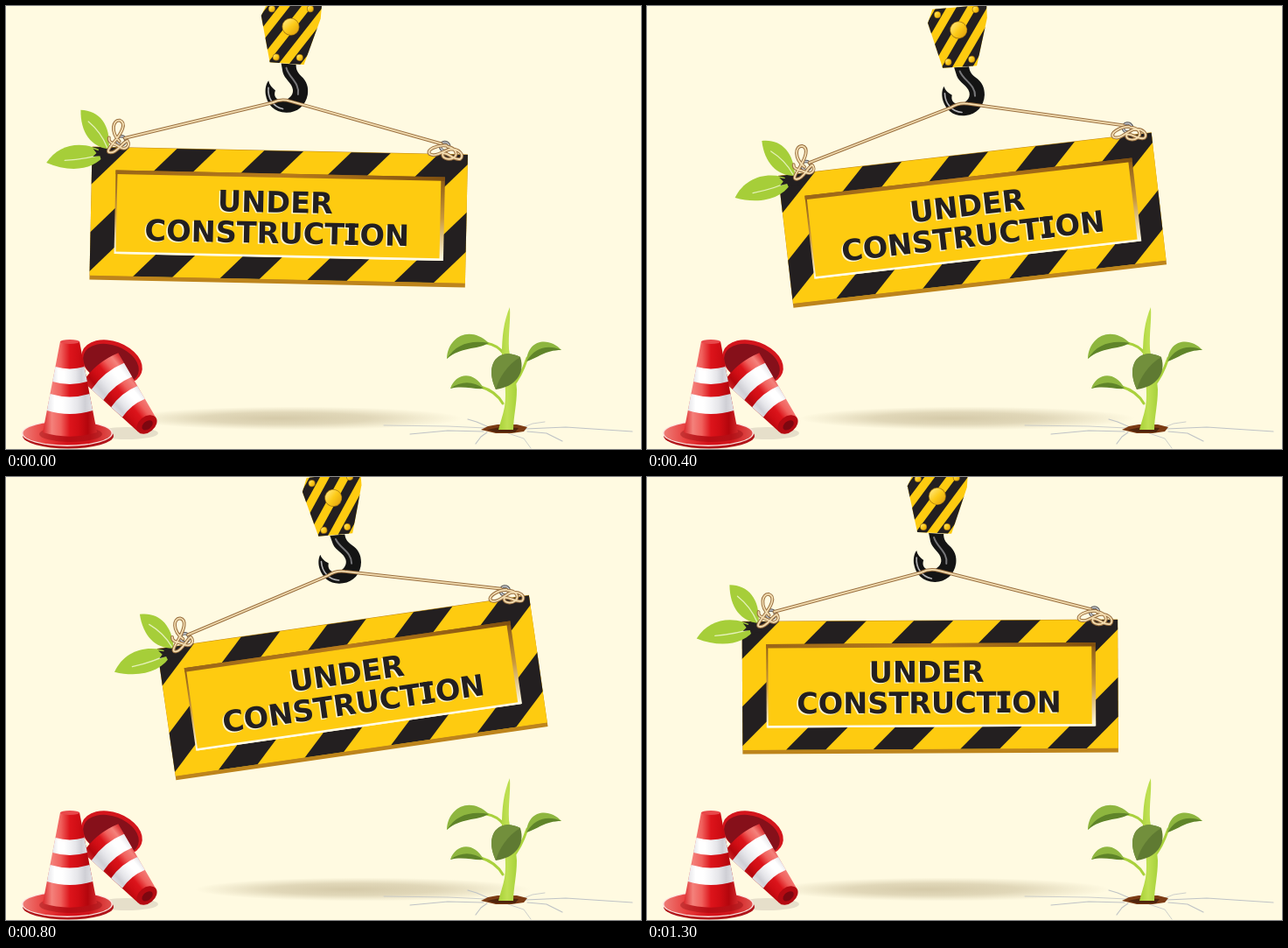
These frames come from a looping animation (726 by 506 pixels, 1400 ms). An HTML page with a canvas:

```html
<!DOCTYPE html>
<html lang="en">
<head>
<meta charset="utf-8">
<title>Under construction</title>
<style>
html, body { margin: 0; width: 100%; height: 100%; overflow: hidden; background: #fffae1; }
canvas { display: block; }
</style>
</head>
<body>
<canvas id="stage" width="726" height="506"></canvas>
<script>
const c = document.getElementById('stage').getContext('2d');
const YELLOW = '#fecb10', BLACK = '#231f20';
const STEP = 100, STEPS = 14;
const PIVOT = { x: 324, y: 237 };

// step, sign centre x, y, angle in degrees, shadow centre x
const poses = [
  [0, 312, 238.5, 1.2, 330],
  [2, 355, 243, -4.6, 374],
  [4, 372, 242, -6.6, 366],
  [6, 394.5, 235.5, -8.9, 417],
  [7, 416, 233, -9.8, 428],
  [8, 396, 238, -8.2, 408],
  [11, 347, 241, -3, 366],
  [12, 333, 239.5, -1.5, 352],
  [13, 324, 237, -0.3, 338]
];

function poseAt(step) {
  const i = poses.findIndex(p => p[0] >= step);
  const b = poses[i], a = poses[Math.max(0, i - 1)];
  const k = b === a ? 0 : (step - a[0]) / (b[0] - a[0]);
  return a.map((v, n) => v + (b[n] - v) * k);
}

function fill(d, color) {
  c.fillStyle = color;
  c.fill(new Path2D(d));
}

function line(d, color, width) {
  c.strokeStyle = color;
  c.lineWidth = width;
  c.stroke(new Path2D(d));
}

function ellipse(x, y, rx, ry, color, tilt = 0) {
  c.fillStyle = color;
  c.beginPath();
  c.ellipse(x, y, rx, ry, tilt, 0, Math.PI * 2);
  c.fill();
}

function ramp(x0, y0, x1, y1, ...colors) {
  const g = c.createLinearGradient(x0, y0, x1, y1);
  colors.forEach((v, i) => g.addColorStop(i / (colors.length - 1), v));
  return g;
}

function rope(d) {
  line(d, '#9a7040', 3.8);
  line(d, '#f2dcb0', 1.8);
}

function shadow(x) {
  c.save();
  c.translate(x, 471);
  c.scale(1, 0.07);
  const g = c.createRadialGradient(-20, 0, 0, 0, 0, 192);
  g.addColorStop(0, 'rgba(150,130,85,.4)');
  g.addColorStop(0.5, 'rgba(150,130,85,.29)');
  g.addColorStop(0.8, 'rgba(150,130,85,.11)');
  g.addColorStop(1, 'rgba(150,130,85,0)');
  ellipse(0, 0, 192, 192, g);
  c.restore();
}

// Tip at the origin, widening downwards
function cone(h, top, foot, bands) {
  const half = y => top + (foot - top) * y / h;
  const band = (y0, y1, colors) => {
    const a = half(y0), b = half(y1);
    fill(`M${-a},${y0} L${-b},${y1} Q0,${y1 + b * 0.3} ${b},${y1} L${a},${y0} Q0,${y0 + a * 0.3} ${-a},${y0}Z`,
      ramp(-b, 0, b, 0, ...colors));
  };
  const red = ['#d9272a', '#f4817b', '#f0605c', '#dc141b', '#cf0d14', '#b3060d', '#cf2a2c'];
  const white = ['#e4e4e8', '#ffffff', '#ffffff', '#f4f4f6', '#e6e6ea', '#cfcfd5', '#e2e2e6'];
  band(0, h, red);
  bands.forEach(([y0, y1]) => band(y0, y1, white));
  ellipse(0, 0.5, top, top * 0.22, '#e8484a');
}

function cones() {
  ellipse(138, 488, 36, 7, 'rgba(140,130,120,.22)');
  ellipse(121, 407, 36, 24, '#d3151c', 0.35);
  ellipse(120, 409, 33, 21.5, '#86101a', 0.35);
  c.save();
  c.translate(161, 478);
  c.rotate(141 * Math.PI / 180);
  cone(84, 13, 26, [[24, 41], [53, 71]]);
  ellipse(0, 0, 13, 9, '#b50a12');
  ellipse(0, -1, 7, 4.5, '#7d0710');
  c.restore();

  ellipse(71, 491, 52, 14.5, '#b0151a');
  ellipse(70, 488, 52, 15, '#fbe3df');
  ellipse(70, 488, 50.5, 13.5, ramp(18, 0, 122, 0, '#ee7f78', '#e8403f', '#d5121a', '#d0161c', '#e05550'));
  ellipse(74, 489, 36, 9, 'rgba(120,0,8,.3)');
  c.save();
  c.translate(73, 383);
  cone(104, 11, 31, [[29, 46], [60, 79]]);
  c.restore();
}

function plant() {
  [
    'M548,482 L505,480 L432,479', 'M546,486 L505,485 L462,489', 'M552,481 L538,475 L528,472',
    'M592,481 L602,477 L616,475', 'M594,483 L640,481 L716,486', 'M596,486 L618,488 L636,497',
    'M574,488 L592,494 L600,505', 'M550,487 L543,492 L537,500'
  ].forEach((d, i) => line(d, '#bfc3c6', i % 3 ? 1.2 : 0.8));
  fill('M543,484 L551,480 L562,478 L584,478 L596,481 L592,486 L578,488 L560,488Z', '#7b3b14');
  fill('M550,484 L565,481 L586,482 L582,487 L560,487Z', '#50240c');

  line('M570,398 Q562,387 549,385', '#a9d13c', 3);
  line('M568,454 Q560,440 543,435', '#a9d13c', 3);
  line('M579,434 Q588,425 596,402', '#a9d13c', 3);
  fill('M576,344 C569,360 567,378 567,398 C569,420 573,440 570,458 C568,468 565,476 563,484 L580,484 C580,470 584,455 584,438 C583,420 577,408 575,392 C574,374 577,360 576,344Z',
    ramp(562, 0, 584, 0, '#a5cf35', '#bfe052', '#a8d23b'));

  fill('M504,403 C505,378 530,364 552,385 C535,384 517,391 504,403Z', '#8eb63f');
  fill('M504,403 C514,386 532,381 552,385 C538,393 520,389 504,403Z', '#5f8429');
  fill('M508,437 C514,419 535,416 546,437 C532,432 520,432 508,437Z', '#8eb63f');
  fill('M508,437 C520,428 534,428 546,437 C534,438 522,433 508,437Z', '#5f8429');
  fill('M635,393 C623,379 597,378 595,406 C603,394 618,391 635,393Z', '#8eb63f');
  fill('M635,393 C620,386 604,390 595,406 C608,402 616,393 635,393Z', '#5f8429');
  fill('M588,401 C564,389 546,408 560,438 C582,435 594,420 588,401Z', '#5f7a32');
  fill('M588,401 C564,389 546,408 560,438 C564,424 573,410 588,401Z', '#728f3c');
}

function pulley() {
  c.save();
  c.translate(333, 22);
  const body = 'M-27,-27 L35,-25 L34,-10 L16,43 L-23,41 L-34,-12Z';
  fill(body, YELLOW);
  c.save();
  c.clip(new Path2D(body));
  for (let x = -69; x < 80; x += 25) {
    fill(`M${x + 22.5},-30 h13 l-60,80 h-13Z`, BLACK);
  }
  c.restore();
  [[-16, 35, 4], [11, 35, 4], [-22, -20, 4], [22, -21, 4], [0, 0, 10]].forEach(([x, y, r]) => {
    ellipse(x, y, r, r, '#a87a10');
    ellipse(x, y, r - 0.8, r - 0.8, ramp(x - r, y - r, x + r, y + r, '#fff0a0', '#fdcb18', '#d9980c'));
  });
  c.restore();
}

function hook() {
  fill('M323,64 L340,65 C340,71 342,74 346,78 C353,84 355,91 354,99 C352,112 342,120 330,120 C316,120 308,111 306,100 C305,94 306,88 309,84 C310,89 313,92 317,95 C315,100 317,105 323,106 C331,107 338,101 337,94 C336,86 327,82 325,74Z', '#141414');
  line('M329,69 C332,80 345,86 343,99', '#77777a', 2);
  line('M309,92 C308,104 315,114 326,116', '#b5b5b8', 1.6);
}

function board() {
  fill('M109,163.5 H538.5 V315.5 H109Z', '#bd841c');
  c.save();
  c.beginPath();
  c.rect(109, 164, 429.5, 146.8);
  c.clip();
  c.fillStyle = YELLOW;
  c.fillRect(109, 163, 430, 148);
  for (let k = -1; k < 6; k++) {
    const x = 207 + k * 99.6;
    fill(`M${x},163 h45 l-148,148 h-45Z`, BLACK);
  }
  c.restore();

  c.fillStyle = ramp(0, 190, 0, 285, '#8a5813', '#c9983a', '#fffbe4');
  c.fillRect(136.5, 190, 376.5, 95.5);
  c.fillStyle = ramp(137, 0, 513, 0, '#9a6618', '#b97c1b', '#80500f');
  c.fillRect(136.5, 190, 376.5, 4.5);
  c.fillStyle = '#fffbe4';
  c.fillRect(138, 283, 374, 2.5);
  c.fillStyle = YELLOW;
  c.fillRect(138.5, 194.5, 370, 88.5);
}

function lettering(dx, dy, color) {
  c.save();
  c.translate(dx, dy);
  c.fillStyle = color;
  c.font = 'bold 33.5px "DejaVu Sans", Verdana, sans-serif';
  c.fillText('UNDER', 253.8, 234.3);
  c.fillText('CONSTRUCT', 171, 269.5);
  c.fillText('ON', 417, 269.5);
  // Slab-serif capital I
  c.fillRect(400.4, 245.1, 14.8, 4.8);
  c.fillRect(404.4, 245.1, 6.8, 24.4);
  c.fillRect(400.4, 264.7, 14.8, 4.8);
  c.restore();
}

function leaves() {
  fill('M95,122 C116,122 130,138 128,166 C108,164 95,148 95,122Z', '#a6ce39');
  fill('M57,183 C72,160 100,156 125,171 C112,191 84,194 57,183Z', '#a6ce39');
  line('M104,135 Q119,147 126,164', '#e4f1b8', 1.3);
  line('M78,180 Q104,178 123,171', '#e4f1b8', 1.3);
  fill('M110,166 l6,2 l2,-4 l5,3 l7,-2 l6,5 l-6,2 l3,6 l-8,-2 l-5,4 l-2,-6 l-8,1 l4,-4Z', BLACK);
}

function ring(x, y) {
  c.beginPath();
  c.arc(x, y, 5, 0, Math.PI * 2);
  c.strokeStyle = '#55565a';
  c.lineWidth = 3.6;
  c.stroke();
  c.strokeStyle = '#c4c6ca';
  c.lineWidth = 1.6;
  c.stroke();
}

function knots() {
  ring(142, 156);
  ring(512, 155);
  rope('M146,153 L314,109 Q324,104 334,107 L508,152');
  rope('M140,157 C129,146 132,132 140,133 C148,136 142,147 136,155 C129,164 124,170 130,170 C138,170 142,159 149,156 C153,162 147,168 140,163 C133,159 127,159 128,153');
  rope('M514,154 C504,153 490,159 495,164 C502,168 510,160 518,158 C529,157 535,165 530,169 C522,171 516,161 510,163 C508,168 516,171 522,168 C529,163 523,156 515,155');
}

function draw(step) {
  const [, x, y, angle, shade] = poseAt(step);
  c.fillStyle = '#fffae1';
  c.fillRect(0, 0, 726, 506);
  c.lineCap = c.lineJoin = 'round';
  shadow(shade);
  plant();
  cones();

  c.save();
  c.translate(x, y);
  c.rotate(angle * Math.PI / 180);
  c.translate(-PIVOT.x, -PIVOT.y);
  hook();
  pulley();
  board();
  lettering(-1.6, 1.2, '#fff6cf');
  lettering(0, 0, BLACK);
  leaves();
  knots();
  c.restore();
}

const start = performance.now();
function tick() {
  draw(Math.floor((performance.now() - start) / STEP) % STEPS);
  requestAnimationFrame(tick);
}
tick();
</script>
</body>
</html>
```
